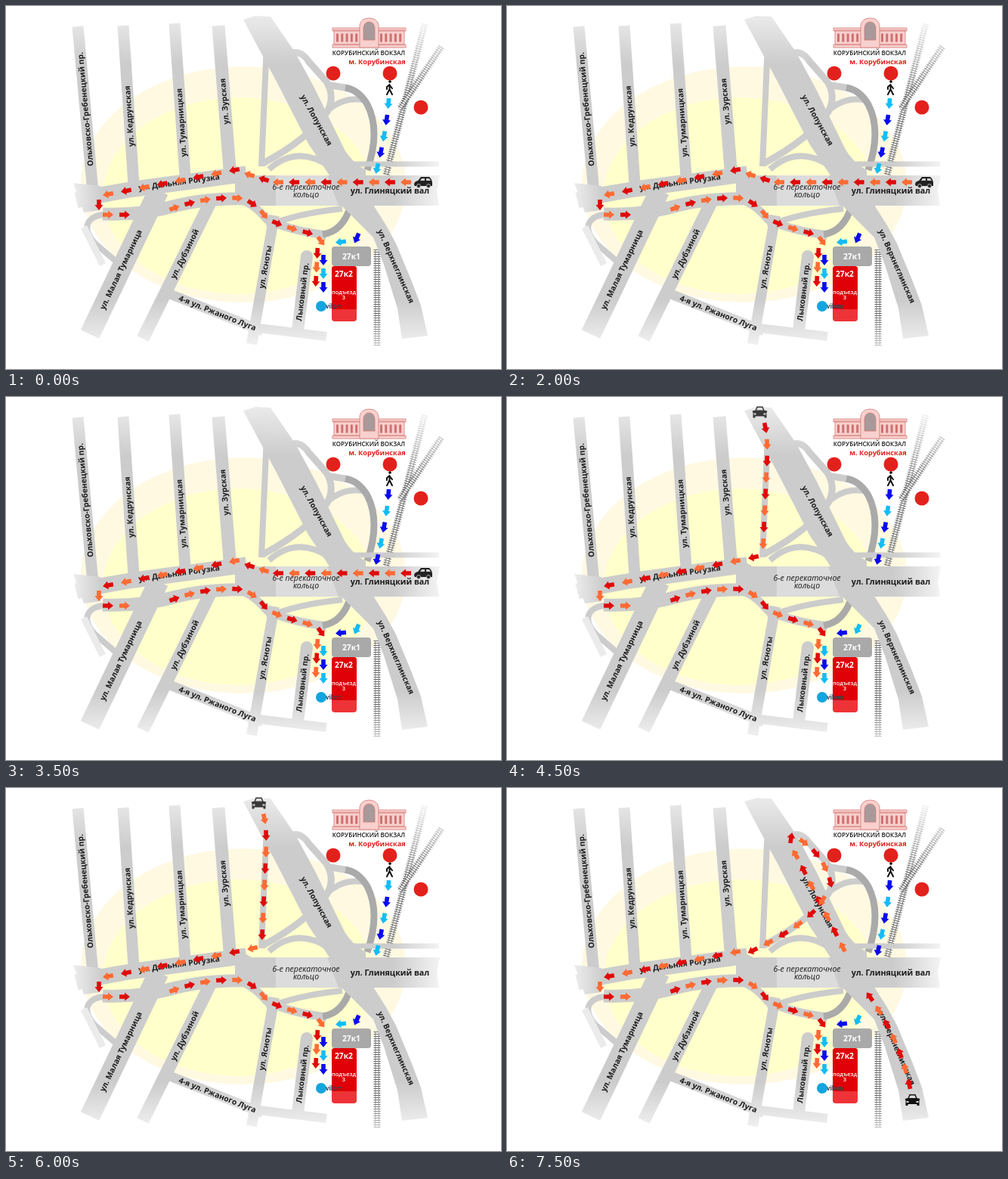
An HTML page for the animation above (8000 ms loop, 655 px wide and 480 px high).

```html
<!DOCTYPE html>
<html lang="ru">
<head>
<meta charset="utf-8">
<title>Схема проезда</title>
<style>
  html, body { margin: 0; width: 100%; height: 100%; overflow: hidden; background: #fff; }
  svg { display: block; width: 655px; height: 480px; }
  text { font: 700 10.3px "Open Sans", "Noto Sans", sans-serif; fill: #1c1c1c; text-anchor: middle; }
  .italic { font-style: italic; font-weight: 400; font-size: 10.6px; }
  .white { fill: #fff; }
  .tiny { fill: #fff; font-size: 7.5px; font-weight: 600; }
  .road { fill: none; stroke: url(#fadeY); }
  .across { fill: none; stroke: url(#fadeX); }
  .rail { fill: none; stroke: url(#railFade); }
</style>
</head>
<body>
<svg viewBox="0 0 655 480">
  <defs>
    <linearGradient id="fadeY" gradientUnits="userSpaceOnUse" x1="0" y1="12" x2="0" y2="445">
      <stop offset="0" stop-color="#ebebeb"/><stop offset=".15" stop-color="#ccc"/>
      <stop offset=".87" stop-color="#ccc"/><stop offset="1" stop-color="#eee"/>
    </linearGradient>
    <linearGradient id="fadeX" gradientUnits="userSpaceOnUse" x1="88" y1="0" x2="575" y2="0">
      <stop offset="0" stop-color="#eee"/><stop offset=".08" stop-color="#ccc"/>
      <stop offset=".87" stop-color="#ccc"/><stop offset="1" stop-color="#f4f4f4"/>
    </linearGradient>
    <linearGradient id="railFade" gradientUnits="userSpaceOnUse" x1="0" y1="22" x2="0" y2="450">
      <stop offset="0" stop-color="#eee"/><stop offset=".22" stop-color="#666"/>
      <stop offset=".9" stop-color="#666"/><stop offset="1" stop-color="#bbb"/>
    </linearGradient>
    <path id="arrow" d="M-7-2.800H0V-5.500L7 0 0 5.500V2.800H-7z"/>
    <g id="front">
      <path d="M-10-1L-6-2-4-7H4L6-2 10-1 9 1V8H6V6H-6V8H-9V1z"/>
      <path d="M-4.500-2L-3-5.500H3L4.500-2zM-8 2H-5V4H-8zM5 2H8V4H5z" fill="#ddd"/>
    </g>
  </defs>

  <ellipse cx="314" cy="236" rx="215" ry="156" fill="#fff9e2"/>
  <ellipse cx="308" cy="251" rx="180" ry="130" fill="#ffc"/>

  <g id="rails"></g>

  <!-- minor roads and ramps -->
  <g class="road" stroke-width="8">
    <path d="M345 50L338 212"/>
    <path d="M372 66Q388 54 401 74L424 100Q436 120 425 140 400 176 340 208" stroke-width="9"/>
    <path d="M408 158Q436 118 472 124"/>
    <path d="M348 216Q385 183 428 212"/>
    <path d="M345 291Q385 274 445 268"/>
    <path d="M155 278C108 268 96 292 118 314L146 338"/>
    <path d="M103 292L128 342" stroke="#ebebeb" stroke-width="9"/>
    <path d="M305 255Q325 258 345 282 375 297 424 303" stroke-width="11"/>
    <path d="M326 425L424 437" stroke-width="12"/>
  </g>
  <g fill="none" stroke="#aaa" stroke-width="9">
    <path d="M448 108Q466 110 478 130 496 165 478 217"/>
    <path d="M419 302Q446 298 456 264"/>
  </g>
  <path class="road" d="M424 104L449 108" stroke-width="9"/>
  <path class="across" d="M445 209H573" stroke-width="7"/>

  <g id="streets"></g>
  <circle cx="398" cy="331" r="8" fill="#ccc"/>

  <!-- main streets -->
  <g fill="url(#fadeY)">
    <path d="M314 18L330 13 350 14 383 62 410 112 448 190Q458 207 476 217V230H432L400 182 358 100 337 61z"/>
    <path d="M440 260H484L503 290 516 314 536 362 549 396 558 436 524 440 518 400 500 342 486 306z"/>
  </g>
  <path class="across" d="M93 257Q120 250 170 242L318 222" stroke-width="21"/>
  <path class="across" d="M128 275Q180 277 225 264 270 253 325 255" stroke-width="17"/>
  <path fill="url(#fadeX)" d="M303 211L325 224H574L570 244 573 264H318L303 246z"/>
  <path fill="url(#fadeX)" d="M89 234L125 238V270L103 273z"/>
  <path fill="#dcdcdc" d="M357 224H425L440 264H357z"/>

  <!-- buildings -->
  <rect x="431" y="318" width="52" height="26" rx="4" fill="#a9a9a9"/>
  <rect x="431" y="344" width="33" height="73" rx="4" fill="#ee3338"/>
  <path d="M431 401V348Q431 344 435 344H460Q464 344 464 348V401z" fill="#df0008"/>
  <g fill="#f8d0cd" stroke="#d47a78" stroke-width=".8" transform="translate(0 -1)">
    <path d="M434 33H527V52H434zM432 30H529V34H432zM432 52H529V56H432z"/>
    <path d="M468 56V26Q470 17 480.500 17 491 17 493 26V56z"/>
    <path d="M473 46V30Q474 22 480.500 22 487 22 488 30V46z" fill="#a89a9a"/>
    <path d="M437 43H466M495 43H525" stroke="#d07070" stroke-width="11" stroke-dasharray="3 3.300"/>
  </g>
  <g fill="#e3211c">
    <circle cx="433" cy="89" r="9.500"/><circle cx="508" cy="89" r="9.500"/><circle cx="549" cy="134" r="9.500"/>
  </g>
  <circle cx="417" cy="397" r="7" fill="#12a5df"/>

  <!-- pedestrian -->
  <g fill="none" stroke="#111" stroke-width="2" stroke-linecap="round" stroke-linejoin="round">
    <circle cx="508" cy="100" r="1.300" fill="#111" stroke-width="1"/>
    <path d="M507.500 104V110L511 117M507.500 110L504 117M507.500 104L504 107V110M508 105L511 109"/>
  </g>

  <g id="labels">
    <text x="508" y="248" style="font-size:10.7px">ул. Глиняцкий вал</text>
    <text x="397" y="243" class="italic">6-е перекаточное</text>
    <text x="397" y="253" class="italic">кольцо</text>
    <text x="480" y="65" style="font-size:8px;font-weight:600">КОРУБИНСКИЙ ВОКЗАЛ</text>
    <text x="491" y="77" style="font-size:9.2px;fill:#e3211c">м. Корубинская</text>
    <text x="457" y="335" class="white">27к1</text>
    <text x="447" y="358" class="white">27к2</text>
    <text x="447" y="381" class="tiny">подъезд</text>
    <text x="447" y="388" class="tiny">3</text>
    <text x="434" y="400" style="font-size:8px;fill:#345">vilom</text>
  </g>
  <g id="walk"></g>
  <g id="drive"></g>

  <g class="car" fill="#222">
    <path d="M540 236Q540 232 545 231L549 226H560Q563 228 564 233V238H541z"/>
    <path d="M548 231L550 228H554V231zM556 228H560L562 231H556z" fill="#ccc"/>
    <g stroke="#ccc" stroke-width=".8"><circle cx="546" cy="238" r="2.500"/><circle cx="559" cy="238" r="2.500"/></g>
  </g>
  <use class="car" href="#front" x="334.500" y="19.500" fill="#383838"/>
  <use class="car" href="#front" x="536.500" y="412" fill="#111"/>
</svg>
<script>
const $ = id => document.getElementById(id);

function add(parent, tag, attrs, text = '') {
  const el = document.createElementNS('http://www.w3.org/2000/svg', tag);
  for (const k in attrs) el.setAttribute(k, attrs[k]);
  el.textContent = text;
  return parent.appendChild(el);
}

// A point some fraction of the way along a path, with its heading.
function along(path, part) {
  const total = path.getTotalLength(), s = part * total;
  const a = path.getPointAtLength(Math.max(0, s - 1));
  const b = path.getPointAtLength(Math.min(total, s + 1));
  const { x, y } = path.getPointAtLength(s);
  const angle = Math.atan2(b.y - a.y, b.x - a.x) * 180 / Math.PI;
  return `translate(${x} ${y}) rotate(${angle})`;
}

// A street with its name written in the direction the path runs.
function street(d, width, name, part) {
  const path = add($('streets'), 'path', { class: 'road', d, 'stroke-width': width });
  add($('labels'), 'text', { transform: along(path, part), y: 3.6 }, name);
}

street('M115 246L95 27', 15, 'Ольховско-Гребенецкий пр.', .5);
street('M169 236L155 26', 15, 'ул. Кедрунская', .43);
street('M237 225L223 23', 15, 'ул. Тумарницкая', .35);
street('M296 215L281 26', 17, 'ул. Зурская', .47);
street('M111 434L202 244', 27, 'ул. Малая Тумарница', .45);
street('M181 440L272 256', 17, 'ул. Дубзиной', .61);
street('M212 379L340 430', 13, '4-я ул. Ржаного Луга', .53);
street('M325 447L355 277', 14, 'ул. Ясноты', .6);
street('M386 429L398 331', 16, 'Лыковный пр.', .52);
street('M385 104L437 198', 0, 'ул. Лопунская', .5);
street('M494 294L538 394', 0, 'ул. Верхнеглинская', .5);
street('M171 241L287 225', 0, 'ул. Дальняя Рогузка', .5);

for (const d of ['M554 24L503 223', 'M576 54L521 136', 'M491 322V449']) {
  add($('rails'), 'path', { class: 'rail', d, 'stroke-width': 9, 'stroke-dasharray': '1 2' });
  add($('rails'), 'path', { class: 'rail', d, 'stroke-width': 5 });
  add($('rails'), 'path', { d, stroke: '#fff', 'stroke-width': 3.4 });
  add($('rails'), 'path', { class: 'rail', d, 'stroke-width': 3.4, 'stroke-dasharray': '1 2' });
}

// Every leg is a path with a number of evenly spaced arrows.
const ending = [
  ['M302 217L135 249', 8],
  ['M123 263V270', 1],
  ['M135 276H157', 2],
  ['M223 267Q265 252 308 254 328 258 343 278 352 288 400 300 412 304 417 311', 11],
  ['M412 327L410 364', 3]
];
const routes = [
  [['M529 233H360', 9], ['M341 229L322 223', 2], ...ending],
  [['M342 41Q346 60 343 106L339 194', 8], ['M326 212L302 217', 1], ...ending],
  [['M532 391Q518 330 480 276', 7], ['M444 210L383 90Q374 76 376 66', 8],
   ['M393 72Q420 92 428 125', 4], ['M417 149Q398 180 325 215', 6], ...ending]
];
const footpath = [
  ['M506 129Q503 165 491 215', 5], ['M464 307L460 316', 1],
  ['M443 312L434 313', 1], ['M420 336V372', 3]
];

function place(group, legs) {
  group.textContent = '';
  for (const [d, count] of legs) {
    const path = add(group, 'path', { d, fill: 'none' });
    for (let i = 0; i < count; i++)
      add(group, 'use', { href: '#arrow', transform: along(path, i / (count - 1 || 1)) });
  }
}

// Colours alternate back from the last arrow and swap on every step.
function paint(group, colors, phase) {
  [...group.querySelectorAll('use')].reverse()
    .forEach((el, i) => el.setAttribute('fill', colors[(i + phase) % 2]));
}

const cars = document.querySelectorAll('.car');
let shownStep, shownRoute;
place($('walk'), footpath);

function frame(now) {
  const step = Math.floor(now % 8000 / 500);
  const route = step < 8 ? 0 : step < 15 ? 1 : 2;
  if (route !== shownRoute) {
    shownRoute = route;
    place($('drive'), routes[route]);
    cars.forEach((car, i) => car.style.display = i === route ? '' : 'none');
  }
  if (step !== shownStep) {
    shownStep = step;
    paint($('walk'), ['#0a0af0', '#12bdf7'], step % 2);
    paint($('drive'), ['#e00a0a', '#ff6a33'], step % 2);
  }
  requestAnimationFrame(frame);
}
frame(performance.now());
</script>
</body>
</html>
```
